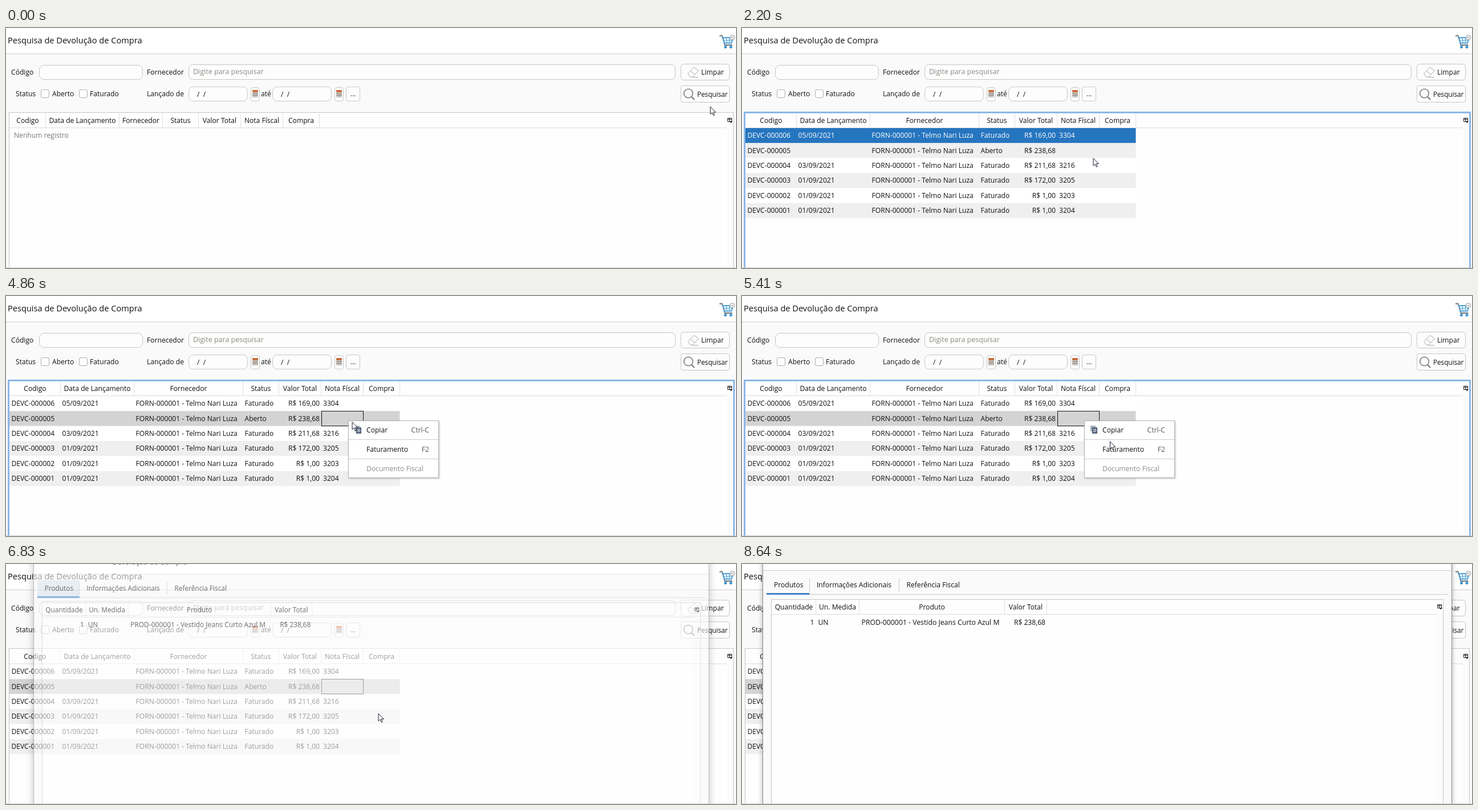
Recreate the animation shown at these times as an HTML page. Size 1280 px wide and 422 px high, loop 8840 ms.

```html
<!DOCTYPE html>
<html lang="pt-BR">
<head>
<meta charset="utf-8">
<title>Pesquisa de Devolução de Compra</title>
<style>
  html, body { margin: 0; width: 100%; height: 100%; overflow: hidden; background: #fafafa; }
  svg { display: block; width: 100vw; height: 100vh; }
  text { font: 12.1px "Open Sans", "Noto Sans", sans-serif; white-space: pre; }
</style>
</head>
<body>
<svg id="stage" viewBox="0 0 1280 422" fill="#111"></svg>
<script>
const LOOP = 8840;
const BLUE = '#2675bf', GREY = '#d3d3d3', LINE = '#c6c6c6';

// Markup helpers
const text = (x, cy, str, attrs = '') => `<text x="${x}" y="${cy + 4.3}" ${attrs}>${str}</text>`;
const middle = 'text-anchor="middle"', end = 'text-anchor="end"';
const size = px => `style="font-size:${px}px"`;
const rect = (x, y, w, h, attrs = '') => `<rect x="${x}" y="${y}" width="${w}" height="${h}" ${attrs}/>`;
const box = (x, y, w, h, r, attrs = `stroke="${LINE}"`) =>
  rect(x + .5, y + .5, w, h, `rx="${r}" fill="#fdfdfd" ${attrs}`);
const path = (d, stroke, width = 1, fill = 'none') =>
  `<path d="${d}" stroke="${stroke}" stroke-width="${width}" fill="${fill}"/>`;
const group = (id, content, attrs = '') => `<g id="${id}" ${attrs}>${content}</g>`;

const header = (left, edges, labels, top, height, lineEnd) =>
  path(`M${left} ${top + height + .5}H${lineEnd}`, '#dcdcdc') +
  labels.map((label, i) => {
    const from = i ? edges[i - 1] : left;
    return text((from + edges[i] + 1) / 2, top + height / 2 + .5, label, middle) +
      path(`M${edges[i] + .5} ${top}v${height}`, '#e0e0e0');
  }).join('');

const columnIcon = (x, y) =>
  path(`M${x + .5} ${y + .5}h7v6h-7zM${x} ${y + 2.5}h8M${x + 3.5} ${y}v7`, '#222') +
  path(`M${x + 3.5} ${y + 6}h5.500l-2.700 3z`, 'none', 0, '#111');

const calendar = x => box(x, 104, 15, 24, 4) +
  rect(x + 3, 109, 10, 13, 'rx="1" fill="#c9c4be"') +
  rect(x + 3, 109, 10, 4, 'rx="1" fill="#c96f3f"') +
  path(`M${x + 3} 115.5h10M${x + 3} 118.5h10`, '#85817d');

const cart =
  path('M1251 13.500h4.500l5 16.500h13', '#6b747c', 1.8) +
  path('M1257 17h18l-3 9.500h-12.500z', '#4d9fd6', 2) +
  path('M1258 21.500h15M1263 17l1 9M1268.500 17v9', '#4d9fd6', 1.2) +
  '<circle cx="1261.500" cy="33.500" r="2.500" fill="#3f94d1"/><circle cx="1271" cy="33.500" r="2.500" fill="#3f94d1"/>' +
  '<circle cx="1273.500" cy="16.500" r="4" fill="#fff" stroke="#8c8c8c"/>' + path('M1271.500 16.500h4', '#777');

const form =
  rect(0, 0, 1280, 422, 'fill="#fafafa"') + rect(0, 0, 1280, 45, 'fill="#fff"') +
  path('M0 45.500H1280', '#cfcfcf') +
  text(3, 22.4, 'Pesquisa de Devolução de Compra', size(14.6)) + cart +
  text(9, 77.5, 'Código') + box(58, 65, 181, 25, 8) +
  text(247, 77.5, 'Fornecedor') + box(320, 64, 853, 26, 7) +
  text(328, 77, 'Digite para pesquisar', 'fill="#8b8b80" ' + size(12.5)) +
  text(17, 116, 'Status') + box(61, 108, 14, 14, 2.5, 'stroke="#b0b0b0"') + text(81, 116, 'Aberto') +
  box(128, 108, 14, 14, 2.5, 'stroke="#b0b0b0"') + text(147, 116, 'Faturado') +
  text(247, 116, 'Lançado de') + box(320, 103, 103, 25, 8) + text(335, 116.5, '/  /') + calendar(429) +
  text(447, 116, 'até') + box(467, 103, 103, 25, 8) + text(482, 116.5, '/  /') + calendar(576) +
  box(596, 103, 24, 25, 4) + text(608.5, 116, '...', middle) +
  box(1183, 63, 85, 28, 4) +
  path('M1195.500 80l11-11 8 6-11 11h-4zM1200 75.500l8 6.500M1203 86.500h11', '#aaa') +
  text(1219, 77.5, 'Limpar') +
  box(1183, 101, 85, 29, 4, 'id="searchButton"') +
  '<circle cx="1196.500" cy="115" r="7.800" fill="none" stroke="#7a7a7a" stroke-width="1.600"/>' +
  path('M1202 121l5 5', '#7a7a7a', 2.2) + text(1212, 116.7, 'Pesquisar', size(11.7));

const ROW = 26.35;
const rows = [
  ['6', '05/09/2021', 'Faturado', '169,00', '3304'],
  ['5', '', 'Aberto', '238,68', ''],
  ['4', '03/09/2021', 'Faturado', '211,68', '3216'],
  ['3', '01/09/2021', 'Faturado', '172,00', '3205'],
  ['2', '01/09/2021', 'Faturado', '1,00', '3203'],
  ['1', '01/09/2021', 'Faturado', '1,00', '3204'],
].map(([code, date, status, total, invoice], i) => {
  const y = 176 + i * ROW, cy = y + 13;
  return group('row' + i, rect(6, y, 684.5, ROW, 'fill="#fff"') +
    text(9.5, cy, 'DEVC-00000' + code) + text(98.5, cy, date) +
    text(227.5, cy, 'FORN-000001 - Telmo Nari Luza') + text(418.5, cy, status) +
    text(550, cy, 'R$ ' + total, end) + text(556, cy, invoice));
}).join('');

const labels = ['Codigo', 'Data de Lançamento', 'Fornecedor', 'Status', 'Valor Total', 'Nota Físcal', 'Compra'];
const table =
  rect(5.5, 148.5, 1270, 300, `fill="#fefefe" stroke="${LINE}"`) +
  rect(1264, 176, 11, 246, 'fill="#fbfbfb"') +
  group('emptyTable', header(6, [69, 198, 274, 337, 411, 485, 549], labels, 150, 25, 1264) +
    text(14, 188.5, 'Nenhum registro', 'fill="#777"')) +
  group('fullTable', header(6, [95, 224, 415, 478, 552, 626, 690], labels, 150, 25, 1264) + rows +
    rect(553.5, 202.5, 73, 26, 'id="cell" fill="none" stroke="#111"')) +
  columnIcon(1265, 158) +
  rect(4.5, 148.5, 1272, 300, 'id="focusFrame" fill="none" stroke="#8cb8e8" stroke-width="3"');

const menuItem = (id, cy, label, key) => group(id,
  rect(601, cy - 13, 157, 26, 'fill="#fff"') + text(632, cy, label) +
  text(742, cy, key, end + ' fill="#555"'));
const menu = group('menu',
  rect(600.5, 219.5, 158, 100, 'fill="#fff" stroke="#b5b5b5" style="filter:drop-shadow(1px 1px 1.5px #0004)"') +
  menuItem('copyItem', 236, 'Copiar', 'Ctrl-C') + menuItem('billItem', 270, 'Faturamento', 'F2') +
  path('M601 252.500H758M601 286.500H758', '#cdcdcd') +
  text(632, 304, 'Documento Fiscal', 'fill="#8c8c8c"') +
  rect(611, 228, 9, 10, 'fill="#a3adba"') + rect(614, 231, 9, 11, 'fill="#56657d"') +
  path('M616 234.500h5M616 236.500h5M616 238.500h5', '#dfe4ea'));

const spokes = Array.from({ length: 12 }, (_, i) =>
  `<path d="M0 -8.500V-13" transform="rotate(${i * 30})"/>`).join('');

const dialog = group('dialog',
  rect(36.5, -40, 1208, 754, 'id="panel" fill="#fafafa" stroke="#8a8a8a"') +
  rect(37, -39, 1207, 50, 'fill="#fff"') + path('M37 11.500H1244', '#cfcfcf') +
  text(177, -10.3, 'Devolução de Compra', size(13)) +
  rect(43, 22, 75.5, 31, 'id="tab" fill="#dae4ed"') +
  path('M43 53.500H1238', '#c8c8c8') + rect(43, 51, 75.5, 3, 'fill="#4083c9"') +
  path('M118.500 25v23M275.500 25v23', '#c8c8c8') +
  text(56, 37, 'Produtos') + text(131, 37, 'Informações Adicionais') + text(288.5, 37, 'Referência Fiscal') +
  rect(51.5, 62.5, 1178, 620, `fill="#fefefe" stroke="${LINE}"`) +
  rect(1218, 89, 11, 590, 'fill="#fbfbfb"') +
  header(52, [129, 205, 460, 534], ['Quantidade', 'Un. Medida', 'Produto', 'Valor Total'], 63, 25, 1218) +
  columnIcon(1219, 71) +
  text(126.5, 102.5, '1', end) + text(133.5, 102.5, 'UN') +
  text(209.5, 102.5, 'PROD-000001 - Vestido Jeans Curto Azul M', size(12.25)) +
  text(532, 102.5, 'R$ 238,68', end));

const stage = document.getElementById('stage');
stage.innerHTML = form + table + menu +
  group('spinner', spokes, 'stroke-width="3" stroke-linecap="round"') + dialog +
  path('M0 421.500H1280', '#cfcfcf') +
  '<circle id="ring" r="12.500" fill-opacity=".47"/>' +
  group('cursor', path('M0 0V13.200L3.100 10.300 5.300 15.300 7.300 14.400 5.200 9.600H9.400Z', '#1c1c30', 1, '#fff'));

const $ = id => document.getElementById(id);
const set = (el, name, value) => el.setAttribute(name, value);
const show = (id, on) => set($(id), 'visibility', on ? 'visible' : 'hidden');

// Timeline in milliseconds
const LOADED = 1530, SELECT = 3150, MENU = 4270, CONFIRM = 6210, OPEN = 6760, BLUR = 8580;
const cursorPath = [
  [0, 1235, 138.5], [70, 1235, 138.5], [270, 1231, 120], [1540, 1231, 120], [1700, 960, 185], [1870, 696, 246],
  [1970, 655, 238], [2200, 616, 229], [2620, 616, 229], [2890, 600, 219], [4800, 600, 219],
  [4860, 607, 221.5], [5200, 633, 244], [5540, 653, 263], [6880, 653, 263], [7090, 1057, 342],
  [7250, 1140, 380], [7450, 1195, 405], [7710, 1230, 421], [8040, 1230, 421], [8050, 1230, 440],
];
const clicks = [[800, 1000, '#ff0'], [SELECT, 3410, '#ff0'], [4140, MENU, '#f00'], [6010, CONFIRM, '#ff0']];
const spins = [[1000, LOADED, 337, 1340, 2], [6270, OPEN, 358, 6270, 10]];
const opening = [[OPEN, .25, .93], [6830, .6, .98], [6890, .85, .993], [6960, .97, .998], [7020, 1, 1]];

function cursorAt(t) {
  const next = cursorPath.findIndex(p => p[0] > t);
  if (next < 0) return cursorPath.at(-1).slice(1);
  const [t0, x0, y0] = cursorPath[next - 1], [t1, x1, y1] = cursorPath[next];
  const k = (t - t0) / (t1 - t0);
  return [x0 + (x1 - x0) * k, y0 + (y1 - y0) * k];
}

function paint(id, background, color) {
  const [back, ...captions] = $(id).children;
  set(back, 'fill', background);
  captions.forEach(caption => caption.style.fill = color || '');
}

function drawSpinner(t) {
  const spin = spins.find(([from, to]) => t >= from && t < to);
  show('spinner', spin);
  if (!spin) return;
  const [, , y, anchor, start] = spin;
  const head = start + Math.floor((t - anchor) / 67);
  set($('spinner'), 'transform', `translate(640.5 ${y})`);
  [...$('spinner').children].forEach((spoke, i) => {
    const age = (((head - i) % 12) + 12) % 12 / 11;
    const mix = (a, b) => Math.round(a + (b - a) * age);
    set(spoke, 'stroke', `rgb(${mix(36, 234)},${mix(52, 234)},${mix(92, 238)})`);
  });
}

function drawDialog(t) {
  show('dialog', t >= OPEN);
  if (t < OPEN) return;
  const [, opacity, scale] = opening.findLast(step => t >= step[0]);
  const active = t < BLUR;
  set($('dialog'), 'opacity', opacity);
  set($('dialog'), 'transform', `translate(640 337) scale(${scale}) translate(-640 -337)`);
  set($('tab'), 'fill', active ? '#dae4ed' : '#fafafa');
  $('panel').style.filter = `drop-shadow(0 2px ${active ? 7 : 4}px rgba(0,0,0,${active ? .4 : .3}))`;
}

function render(t) {
  const [x, y] = cursorAt(t);
  set($('cursor'), 'transform', `translate(${x} ${y})`);

  const click = clicks.find(([from, to]) => t >= from && t < to);
  show('ring', click);
  if (click) {
    set($('ring'), 'fill', click[2]);
    set($('ring'), 'transform', `translate(${x} ${y})`);
  }

  const hover = x > 1183 && y < 131 && t < LOADED + 100, focused = t >= 800 && t < LOADED;
  set($('searchButton'), 'fill', hover ? '#fca93f' : '#fdfdfd');
  set($('searchButton'), 'stroke', focused ? '#8fa6b8' : LINE);
  set($('searchButton'), 'stroke-width', focused ? 2 : 1);

  show('emptyTable', t < LOADED);
  show('fullTable', t >= LOADED);
  show('focusFrame', t >= LOADED && t < CONFIRM);
  show('cell', t >= SELECT);
  const selected = t < SELECT ? 0 : 1;
  for (let i = 0; i < 6; i++) {
    if (i !== selected) paint('row' + i, i % 2 ? '#efefef' : '#fff');
    else if (t < MENU) paint('row' + i, BLUE, '#fff');
    else paint('row' + i, GREY);
  }

  const menuOpen = t >= MENU && t < CONFIRM;
  show('menu', menuOpen);
  for (const [id, cy] of [['copyItem', 236], ['billItem', 270]]) {
    const over = menuOpen && Math.abs(y - cy) < 14;
    paint(id, over ? BLUE : '#fff', over && '#fff');
  }

  drawSpinner(t);
  drawDialog(t);
}

function tick() {
  render(performance.now() % LOOP);
  requestAnimationFrame(tick);
}
tick();
</script>
</body>
</html>
```
